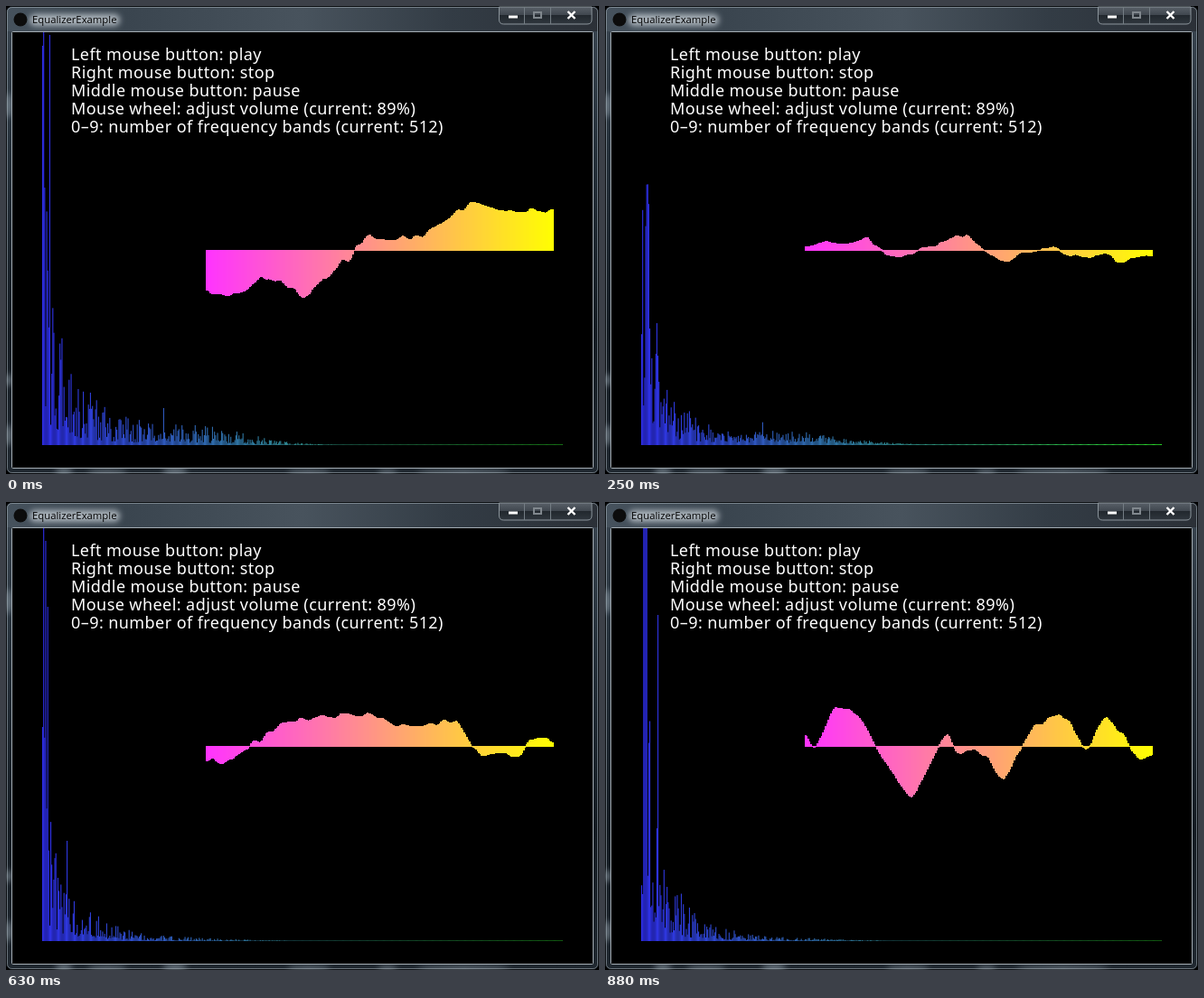
Animation of 656x518 px, one loop 1.01 s. Source, as an HTML page with a canvas:

```html
<!DOCTYPE html>
<html lang="en">
<head>
<meta charset="utf-8">
<title>EqualizerExample</title>
<style>
  html, body { margin: 0; width: 656px; height: 518px; overflow: hidden; background: #000; }
  svg, canvas { position: absolute; left: 0; top: 0; }
  .title { font: 11.3px "Open Sans", sans-serif; }
  .help { font: 18px "Noto Sans", sans-serif; letter-spacing: .43px; fill: #fff; }
</style>
</head>
<body>
<svg width="656" height="518">
  <defs>
    <linearGradient id="glass">
      <stop offset="0" stop-color="#46525d"/>
      <stop offset=".2" stop-color="#3a454f"/>
      <stop offset=".5" stop-color="#48535d"/>
      <stop offset=".75" stop-color="#333c45"/>
      <stop offset="1" stop-color="#2b3037"/>
    </linearGradient>
    <linearGradient id="side" x2="0" y2="1">
      <stop offset="0" stop-color="#3c4752"/>
      <stop offset=".3" stop-color="#26313b"/>
      <stop offset=".7" stop-color="#141b22"/>
      <stop offset="1" stop-color="#202830"/>
    </linearGradient>
    <linearGradient id="button" x2="0" y2="1">
      <stop offset="0" stop-color="#596068"/>
      <stop offset=".48" stop-color="#3f464e"/>
      <stop offset=".5" stop-color="#22282e"/>
      <stop offset="1" stop-color="#30373e"/>
    </linearGradient>
    <filter id="blur"><feGaussianBlur stdDeviation="3"/></filter>
  </defs>
  <rect x=".5" y=".5" width="655" height="517" rx="6" fill="url(#side)" stroke="#0a0d10"/>
  <path d="M1 28V7q0-6 6-6H649q6 0 6 6V28z" fill="url(#glass)"/>
  <g fill="#a9b8c4" filter="url(#blur)" opacity=".65">
    <rect x="26" y="9" width="100" height="13" rx="6" fill="#e4ebf1"/>
    <ellipse cx="3" cy="110" rx="3" ry="14"/>
    <ellipse cx="3" cy="414" rx="3" ry="7"/>
    <ellipse cx="3" cy="475" rx="3" ry="12"/>
    <ellipse cx="64" cy="515" rx="10" ry="3"/>
    <ellipse cx="112" cy="516" rx="22" ry="2"/>
    <ellipse cx="187" cy="515" rx="14" ry="3"/>
    <ellipse cx="335" cy="516" rx="24" ry="2"/>
    <ellipse cx="422" cy="516" rx="11" ry="2"/>
    <ellipse cx="506" cy="516" rx="52" ry="2"/>
  </g>
  <rect x="1.5" y="1.5" width="653" height="515" rx="5" fill="none" stroke="#b6c1ca" stroke-opacity=".5"/>
  <rect x="6.5" y="28.5" width="643" height="483" rx="1" fill="#000" stroke="#a4adb4"/>
  <circle cx="16" cy="15" r="7.5" fill="#0c0c0c"/>
  <text class="title" x="29" y="19">EqualizerExample</text>
  <path d="M545.5 1V15q0 5 5 5H643q5 0 5-5V1z" fill="url(#button)" stroke="#8b949b"/>
  <path d="M573.5 1V20M602.5 1V20" stroke="#747d84"/>
  <rect x="556" y="10.5" width="10" height="3" fill="#fff"/>
  <rect x="584" y="7" width="8" height="6" fill="none" stroke="#80878d" stroke-width="2"/>
  <path d="M621.5 6l8 8m0-8l-8 8" stroke="#fff" stroke-width="2.4"/>
  <g class="help">
    <text x="72" y="60">Left mouse button: play</text>
    <text x="72" y="80">Right mouse button: stop</text>
    <text x="72" y="100">Middle mouse button: pause</text>
    <text x="72" y="120">Mouse wheel: adjust volume (current: 89%)</text>
    <text x="72" y="140">0–9: number of frequency bands (current: 512)</text>
  </g>
</svg>
<canvas id="stage" width="656" height="518"></canvas>
<script>
const ctx = document.getElementById('stage').getContext('2d');
const BANDS = 512, BAND_X = 40, BAND_STEP = 1.125, FLOOR = 486, FULL = 457;
const SAMPLES = 257, WAVE_X = 221, WAVE_STEP = 1.5, WAVE_END = 606, AXIS = 270;
const LOOP = 1010;

function randomizer(seed) {
  return () => {
    seed = (seed * 16807) % 2147483647;
    return seed / 2147483647;
  };
}

const smooth = f => f * f * (3 - 2 * f);

// Bass and treble fade out exponentially; a low hump of mid tones sits around x = 215.
function spectrum(random, { bass, level, decay, mid, tail, peaks }) {
  const bands = Array.from({ length: BANDS }, (_, i) => {
    const x = i * BAND_STEP;
    const envelope = bass * Math.exp(-x / 9) + level * Math.exp(-x / decay)
      + mid * Math.exp(-(((x - 175) / 75) ** 2));
    return Math.max(tail, envelope * (.1 + .9 * random() ** 1.6));
  });
  for (const [x, height] of peaks) bands[Math.round((x - BAND_X) / BAND_STEP)] = height;
  return bands;
}

// Eased path through the turning points, roughened with smooth noise.
function waveform(random, turns) {
  const noise = Array.from({ length: 60 }, () => (random() - .5) * 7);
  return Array.from({ length: SAMPLES }, (_, i) => {
    const x = WAVE_X + i * WAVE_STEP;
    const next = Math.max(1, turns.findIndex(([turnX]) => turnX >= x));
    const [x0, y0] = turns[next - 1], [x1, y1] = turns[next];
    const f = (x - x0) / (x1 - x0);
    const n = Math.floor(i / 5), ripple = noise[n] + (noise[n + 1] - noise[n]) * smooth(i / 5 - n);
    return y0 + (y1 - y0) * (f + smooth(f)) / 2 + ripple;
  });
}

function scene(seed, turns, tones) {
  const random = randomizer(seed * 7919);
  return { bands: spectrum(random, tones), samples: waveform(random, turns) };
}

function blend(a, b) {
  const mean = (p, q) => p.map((v, i) => (v + q[i]) / 2);
  return { bands: mean(a.bands, b.bands), samples: mean(a.samples, b.samples) };
}

const rise = scene(3,
  [[221, -45], [250, -50], [290, -28], [330, -50], [380, -8], [396, 14], [455, 13], [512, 50], [606, 42]],
  { bass: 230, level: 150, decay: 55, mid: 16, tail: .5, peaks: [[40, 442], [41, FULL], [48, 454], [174, 41]] });
const drift = scene(5,
  [[221, 20], [245, 25], [334, 4], [364, 20], [388, -2], [436, -4], [455, 17], [480, -12], [524, -28], [572, 0], [606, -16]],
  { bass: 200, level: 105, decay: 50, mid: 20, tail: .4, peaks: [[41, FULL], [45, 238], [48, 455], [58, 130]] });
const hump = scene(8,
  [[221, -11], [265, -5], [290, 11], [312, -18], [366, -11], [390, 40], [447, -30], [495, 24], [552, 2], [572, -23], [606, 8]],
  { bass: 330, level: 110, decay: 50, mid: 9, tail: 1.5, peaks: [[46, FULL], [47, FULL], [57, 230], [174, 46]] });
const fall = scene(11,
  [[221, 54], [245, 34], [260, 5], [303, -10], [316, 8], [355, -51], [377, -59], [440, -36], [480, -55], [525, -46], [548, -15], [606, -16]],
  { bass: 240, level: 170, decay: 42, mid: 5, tail: 2, peaks: [[40, FULL], [42, FULL], [46, 398], [48, 427], [171, 35]] });
const plateau = scene(14,
  [[221, -14], [238, -18], [265, 0], [318, 30], [396, 36], [425, 24], [497, 27], [526, -10], [570, -7], [580, 8], [606, 6]],
  { bass: 170, level: 120, decay: 42, mid: 2, tail: .4, peaks: [[41, FULL], [43, 443], [46, 370], [67, 111]] });
const swing = scene(17,
  [[221, 10], [233, 0], [255, 42], [268, 42], [338, -56], [378, 12], [390, -5], [415, -6], [440, -35], [475, 22], [502, 36], [532, 0], [555, 32], [592, -12], [606, -7]],
  { bass: 420, level: 150, decay: 40, mid: 2, tail: .4, peaks: [[42, FULL], [43, FULL], [45, FULL], [46, FULL], [58, 361]] });

const timeline = [
  [0, rise], [130, drift], [250, blend(drift, hump)], [380, hump],
  [500, fall], [630, plateau], [750, blend(plateau, swing)], [880, swing],
];

function draw({ bands, samples }) {
  ctx.clearRect(0, 0, 656, 518);
  ctx.globalAlpha = .9;
  bands.forEach((height, i) => {
    const f = i / BANDS, h = Math.min(height, FULL);
    ctx.fillStyle = `rgb(51 ${51 + 204 * f} ${255 - 204 * f})`;
    ctx.fillRect(BAND_X + i * BAND_STEP, FLOOR - h, BAND_STEP, h);
  });
  ctx.globalAlpha = 1;
  samples.forEach((height, i) => {
    const f = i / SAMPLES, h = Math.round(height);
    const x = WAVE_X + Math.floor(i * WAVE_STEP);
    ctx.fillStyle = `rgb(255 ${51 + 204 * f} ${255 - 255 * f})`;
    ctx.fillRect(x, AXIS - Math.max(h, 0), Math.min(2, WAVE_END - x), Math.abs(h) + 1);
  });
}

let shown;
function tick() {
  const time = performance.now() % LOOP;
  const current = timeline.findLast(([start]) => time >= start)[1];
  if (current !== shown) draw(shown = current);
  requestAnimationFrame(tick);
}
tick();
</script>
</body>
</html>
```
